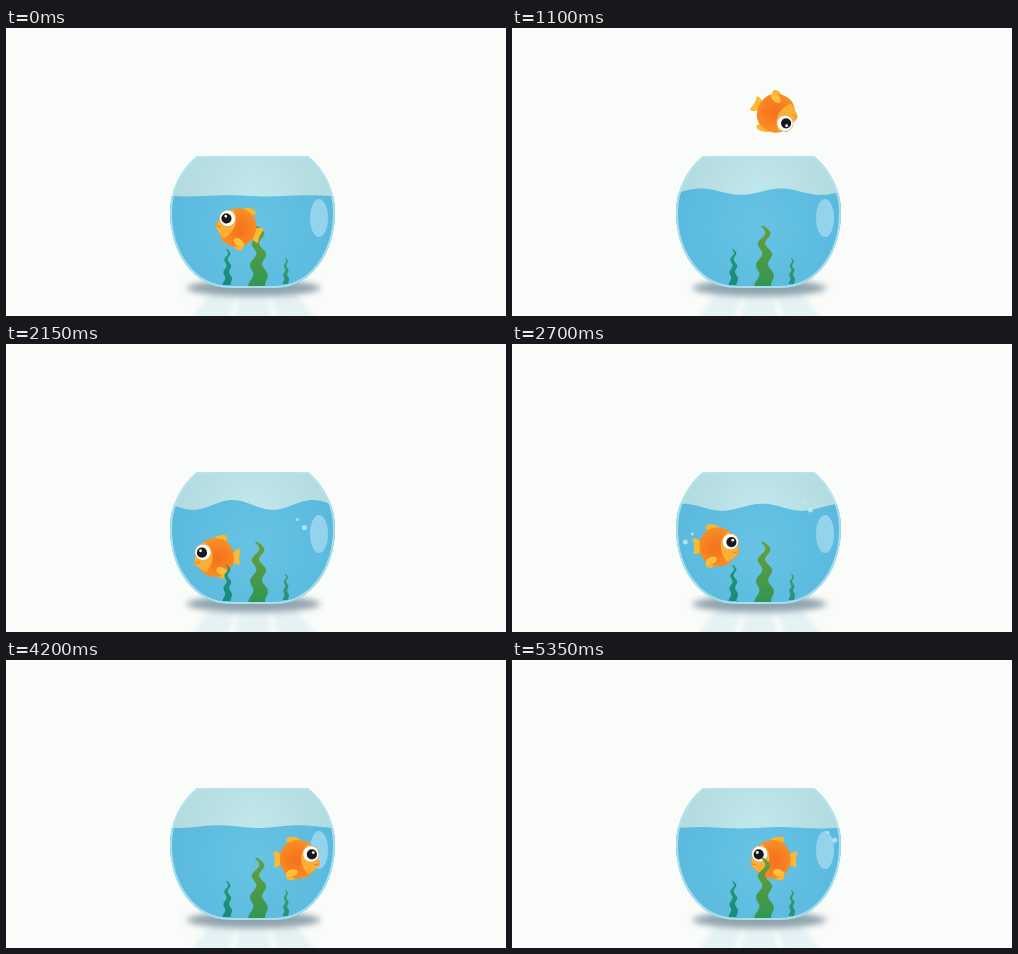
An HTML page with a canvas that plays this animation: 500 by 288 pixels, repeating every 5400 ms.

```html
<!DOCTYPE html>
<html lang="en">
<head>
<meta charset="utf-8">
<title>Goldfish bowl</title>
<style>
html, body { margin: 0; width: 100%; height: 100%; overflow: hidden; background: #fafcf9; }
canvas { display: block; }
</style>
</head>
<body>
<canvas id="stage" width="500" height="288"></canvas>
<script>
const c = document.getElementById('stage').getContext('2d');
const { PI, sin, cos, exp, max, min } = Math;
const LOOP = 5400, APEX = 720, ENTRY = 1400, TURN = 2380, CROSSING = 2100;

const mix = (a, b, u) => a + (b - a) * u;
const clamp = (u, lo = 0, hi = 1) => max(lo, min(hi, u));
const smooth = u => (u = clamp(u), u * u * (3 - 2 * u));
const pulse = (t, start, length) => sin(PI * clamp((t - start) / length)) ** 2;
const hump = (x, center, width) => exp(-(((x - center) / width) ** 2));

function oval(x, y, rx, ry, color, turn = 0) {
  c.fillStyle = color;
  c.beginPath();
  c.ellipse(x, y, rx, ry, turn, 0, 7);
  c.fill();
}

function radial(x, y, r, inner, outer) {
  const g = c.createRadialGradient(x, y, r / 8, x, y, r);
  g.addColorStop(0, inner);
  g.addColorStop(1, outer);
  return g;
}

// The fish leaps, somersaults, sinks, then swims back and forth.
function pose(t) {
  const phase = max(-PI / 2, PI * (t - TURN) / CROSSING);
  const facing = clamp(8 * sin(phase), -1, 1);
  const turn = 20 + 340 * clamp(t / 1700) ** 1.4;
  const leapX = 232 + .0285 * min(t, ENTRY);
  const x = t < TURN
    ? mix(leapX, 200, smooth((t - ENTRY) / (TURN - ENTRY)))
    : 248 - 48 * cos(phase);
  const sink = (t - ENTRY) / 1000;
  const y = t < APEX ? 48 + 152 * (1 - t / APEX) ** 2
    : t < ENTRY ? 48 + 37 * ((t - APEX) / 380) ** 2
    : 199 + (320 * sink - 32) * exp(-sink / .28);
  return { x, y, turn: turn * PI / 180, facing };
}

// A drifting wave that dies down, plus the bumps of leaving and landing.
function waterY(x, t) {
  const splash = pulse(t, 1400, 500);
  const swell = t < 1650
    ? mix(.6, 3.2, smooth(t / 400))
    : 3.5 * exp((2700 - t) / 1600) * (1 - .5 * splash);
  const wave = cos(2 * PI * ((x - 250) / 80 - (t - 2700) / 425));
  const crown = 36 * hump(x, 268, 14) + 34 * hump(x, 299, 17) - 18 * hump(x, 222, 32);
  return 168.8 - swell * (1.6 + wave * (1 - splash))
    - splash * crown - 12 * pulse(t, 80, 400) * hump(x, 238, 15);
}

function ground() {
  c.fillStyle = '#fafcf9';
  c.fillRect(0, 0, 500, 288);
  c.save();
  c.filter = 'blur(2px)';
  c.fillStyle = 'rgba(195,226,236,.38)';
  for (let i = -1; i <= 1; i++) {
    c.beginPath();
    c.moveTo(234 + i * 28, 262);
    c.lineTo(260 + i * 28, 262);
    c.lineTo(266 + i * 44, 292);
    c.lineTo(229 + i * 44, 292);
    c.fill();
  }
  c.filter = 'blur(3px)';
  oval(247.5, 260, 67, 8, '#8fa2ac');
  c.restore();
}

function bowlPath() {
  const rise = Math.asin(56 / 76);
  c.beginPath();
  c.ellipse(246.5, 184, 82.5, 76, 0, PI, PI + rise);
  c.ellipse(246.5, 184, 82.5, 76, 0, -rise, 0);
  c.bezierCurveTo(329, 224, 306, 260, 268, 260);
  c.lineTo(225, 260);
  c.bezierCurveTo(187, 260, 164, 224, 164, 184);
  c.closePath();
}

function bowl(t) {
  c.save();
  bowlPath();
  c.clip();
  c.fillStyle = radial(247, 165, 85, '#bfe6ea', '#b1dade');
  c.fillRect(160, 120, 180, 150);
  c.fillStyle = radial(247, 200, 90, '#65c2e3', '#59b9dd');
  c.beginPath();
  c.moveTo(160, 270);
  for (let x = 160; x <= 334; x += 2) c.lineTo(x, waterY(x, t));
  c.lineTo(334, 270);
  c.fill();
  bowlPath();
  c.strokeStyle = 'rgba(180,228,238,.85)';
  c.lineWidth = 4;
  c.stroke();
  c.restore();
}

function drops(t) {
  const s = (t - 1650) / 1000;
  if (s < -.22 || s > .4) return;
  for (let i = 0; i < 3; i++) {
    const y = 112 + 2 * i - 20 * s + 430 * s * s;
    const r = 4.2 - .8 * i;
    if (y < 158) oval(248 + 32 * i + (i - 1) * 45 * s, y, r, r * .7, '#78c5df', .5);
  }
}

function weed(x, top, base, width, sway, tip, root) {
  const g = c.createLinearGradient(0, top, 0, base);
  g.addColorStop(0, tip);
  g.addColorStop(1, root);
  c.fillStyle = g;
  c.beginPath();
  for (const side of [-1, 1]) {
    for (let n = 0; n <= 40; n++) {
      const p = side < 0 ? 1 - n / 40 : n / 40;
      const half = width * (.2 + .8 * p) / 2;
      c.lineTo(x + sin(p * 18 - .6) * sway * (1 - p * .5) + side * half, mix(top, base, p));
    }
  }
  c.fill();
}

function plants() {
  weed(221.5, 221, 257, 8, 1.8, '#279477', '#188c7a');
  weed(252.5, 198, 258, 17, 3.6, '#6b9e38', '#329653');
  weed(280, 230, 256, 5.5, 1.2, '#439a65', '#27917b');
}

function fish({ x, y, turn, facing }, t) {
  const flap = sin(t / 90);
  c.save();
  c.translate(x, y);
  c.rotate(turn);
  c.scale(facing, 1);

  c.fillStyle = '#fbb934';
  c.beginPath();
  c.moveTo(-15, -1);
  c.quadraticCurveTo(-20, -10, -25, -7 + flap);
  c.quadraticCurveTo(-22, 0, -24, 8 + flap);
  c.quadraticCurveTo(-18, 8, -15, 3);
  c.fill();
  oval(-4, -18, 8, 4, '#f9b62f', .25);
  oval(-6, 17, 6, 4, '#fbb52d', -.4);

  c.fillStyle = radial(-2, 1, 23, '#f5741f', '#fa9426');
  c.beginPath();
  c.moveTo(-18, 0);
  c.bezierCurveTo(-18, -14, -8, -20, 3, -19);
  c.bezierCurveTo(13, -18, 19, -9, 20, 0);
  c.bezierCurveTo(24, 4, 21, 9, 17, 10);
  c.bezierCurveTo(12, 19, 4, 21, -4, 19);
  c.bezierCurveTo(-13, 17, -18, 9, -18, 0);
  c.fill();

  c.fillStyle = '#fbb035';
  c.beginPath();
  c.moveTo(11, -15);
  c.bezierCurveTo(1, -9, 1, 6, 10, 15);
  c.bezierCurveTo(16, 12, 17, 10, 19, 9);
  c.bezierCurveTo(24, 5, 19, -11, 11, -15);
  c.fill();
  c.strokeStyle = '#ef7d1b';
  c.beginPath();
  c.moveTo(21, 5);
  c.lineTo(16, 6);
  c.stroke();
  oval(-6, 14, 6, 3.6, '#fcc03c', -.35 + flap * .15);

  oval(13, -5, 8.4, 8.4, '#d8a46a');
  oval(13, -5, 7.8, 7.8, '#fffdf6');
  oval(14, -4.6, 5.1, 5.1, '#17191d');
  oval(15.4, -6.5, 1.4, 1.4, '#fff');
  c.restore();
}

// A pair of bubbles leaves the tail after the landing and each turn.
function bubbles(t) {
  for (const born of [ENTRY + 50, TURN + 70, TURN + CROSSING + 70]) {
    const age = (t - born) / 1000;
    if (age < 0 || age > 1.3) continue;
    const { x, facing } = pose(born);
    const back = -Math.sign(facing);
    for (let i = 0; i < 2; i++) {
      oval(x + back * (20 + 7 * i), 198 + 8 * i - 32 * age, 1.5 + i, 1.5 + i, 'rgba(190,231,244,.85)');
    }
  }
}

function draw(t) {
  const now = pose(t);
  const behind = t > ENTRY && now.facing < 0;
  ground();
  bowl(t);
  drops(t);
  oval(313, 190, 9, 19, '#93d4ec');
  if (behind) fish(now, t);
  plants();
  if (!behind) fish(now, t);
  bubbles(t);
}

function tick() {
  draw(performance.now() % LOOP);
  requestAnimationFrame(tick);
}
tick();
</script>
</body>
</html>
```
